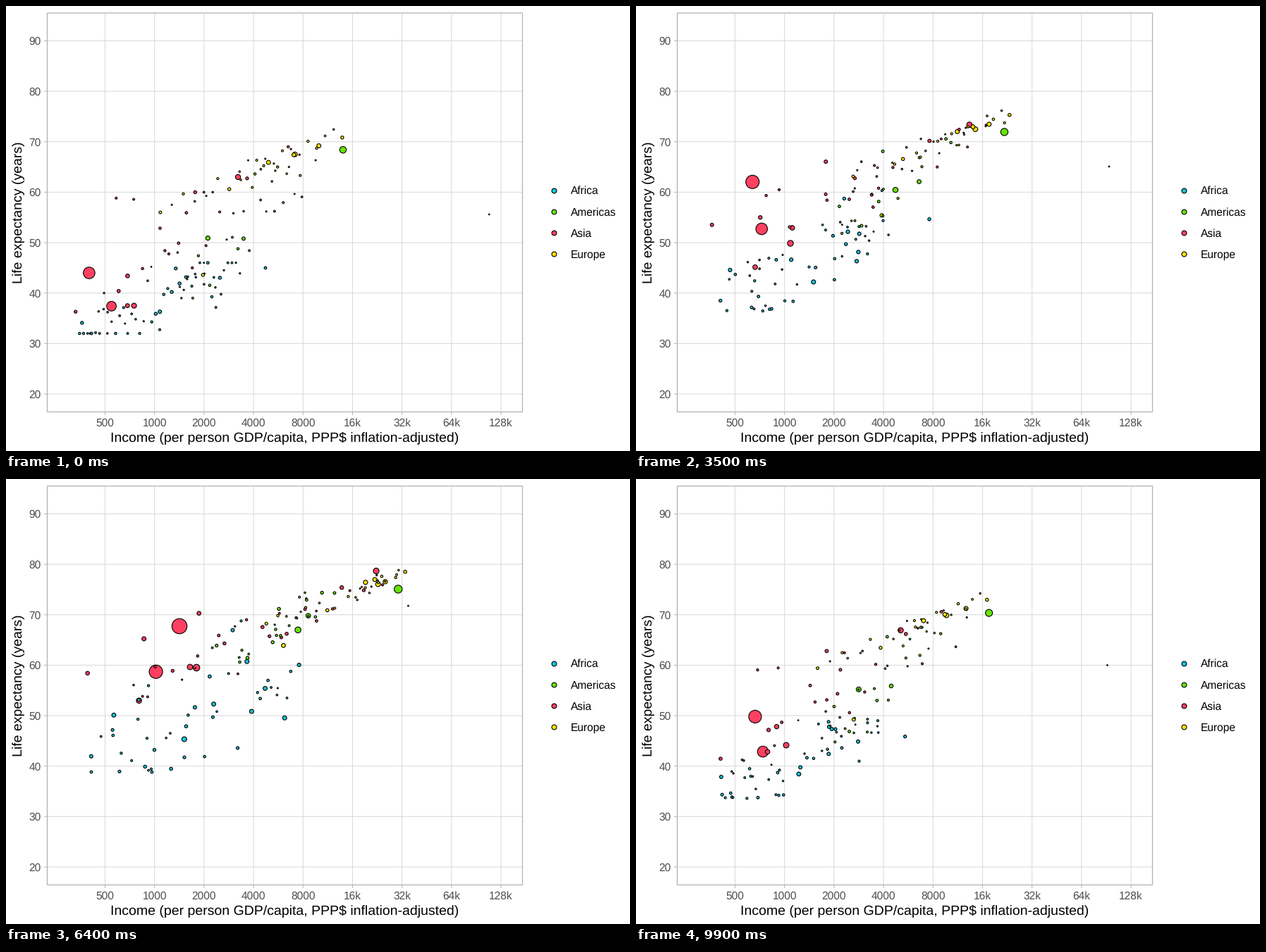
A matplotlib script that plays this animation: 885x632 px, repeating every 10000 ms.

```python
import numpy as np
import matplotlib.pyplot as plt
from matplotlib.animation import FuncAnimation

W, H, DPI = 885, 632, 100
PX = 72 / DPI
LEFT, RIGHT, TOP, BOTTOM = 58.5, 732.5, 10, 576.5
plt.rcParams["font.family"] = "Liberation Sans"
plt.rcParams["text.hinting"] = "none"

COLORS = {"Africa": "#12c3db", "Americas": "#66e400",
          "Asia": "#ff4161", "Europe": "#ffe000"}
GROWTH = {"Africa": 3.7, "Americas": 3.3, "Asia": 2.8, "Europe": 1.25}
# How early income and life expectancy rise; 1 is a steady rise.
BEND = {"Africa": (1.1, 1.8), "Americas": (1.1, 1.3),
        "Asia": (1, 1.25), "Europe": (1.4, 1.2)}

rng = np.random.default_rng(11)
U = np.linspace(0, 1, 12)  # every fifth year from 1952 to 2007
dots = []


def x_of(income):
    return 140.5 + 70.2 * np.log2(np.asarray(income) / 500)


def y_of(years):
    return 49.5 + (90 - np.asarray(years)) * 7.164


def path(points, bend):
    """Spread evenly spaced key points over all the years."""
    u = 1 - (1 - U) ** bend if len(points) == 2 else U
    return np.interp(u, np.linspace(0, 1, len(points)), points)


def add(continent, pop, income, life, growth=None, dip=(0, 0), wobble=0):
    """Add one country; a dip is (step, years of life lost)."""
    bend_income, bend_life = BEND[continent]
    x = path(x_of(income), bend_income) + wobble
    years = path(life, bend_life)
    years[dip[0]] -= dip[1]
    people = pop * (growth or GROWTH[continent]) ** U
    radius = .64 + 11.7 * np.sqrt(people / 1318)
    dots.append((np.array([x, y_of(years), radius]), COLORS[continent]))


def crowd(continent, count, income, life, late_income, late_life, jitter=.2):
    """Scatter small countries between a poor and a rich end."""
    for rank in (np.arange(count) + .5) / count:
        def pick(low, high):
            q = np.clip(rank + rng.normal(0, jitter), 0, 1)
            return low + (high - low) * q

        incomes = (income[0] * (income[1] / income[0]) ** rank,
                   2 ** pick(*np.log2(late_income)))
        swing = rng.normal(0, 18) * np.sin(np.pi * U)
        wobble = swing * np.sin(2 * np.pi * U + rng.uniform(0, 6))
        pop = np.clip(rng.lognormal(1.5, 1), .15, 22)
        add(continent, pop, incomes, (pick(*life), pick(*late_life)), wobble=wobble)


# The largest and most distinct countries, by key points
add("Asia", 556, (400, 513, 670, 1210, 2160, 4959),
    (44, 55, 63.6, 66.8, 70.2, 73), growth=2.37, dip=(2, 9.5))
add("Asia", 372, (547, 665, 740, 930, 1300, 2452), (37.4, 52.1, 59, 64.7), growth=3)
add("Asia", 82, (750, 1030, 1830, 3541), (37.5, 54.5, 70.7))
add("Asia", 86, (3217, 12600, 23000, 31656), (63, 72.8, 79, 82.6), growth=1.5)
add("Asia", 47, (684, 650, 800, 1391), (37.5, 48, 64.1))
add("Asia", 41, (685, 2606), (43.4, 65.5), growth=4)
add("Asia", 26, (605, 700, 840, 2442), (40.4, 74.2))
add("Asia", 20, (331, 360, 380, 944), (36.3, 53, 58.7, 62.1))
add("Asia", .2, (108382, 105000, 31500, 47307), (55.6, 77.6))
add("Americas", 158, (13990, 42952), (68.4, 70.3, 73.9, 75.8, 78.2), growth=1.9)
add("Americas", 57, (2109, 4500, 7700, 9066), (50.9, 72.4))
add("Americas", 30, (3478, 6400, 8700, 11978), (50.8, 76.2))
add("Europe", 69, (7144, 32170), (67.5, 79.4))
add("Europe", 50, (9980, 33203), (69.2, 79.4))
add("Europe", 48, (4931, 28570), (65.9, 80.5))
add("Europe", 42, (7030, 30470), (67.4, 80.7))
add("Europe", 22, (1969, 8458), (43.6, 71.8), growth=3.2)
add("Africa", 33, (1077, 1500, 1500, 2014), (36.3, 46.9))
add("Africa", 22, (1419, 5581), (41.9, 56, 71.3))
add("Africa", 21, (362, 691), (34.1, 52.9))
add("Africa", 14, (4725, 7600, 7500, 9270), (45, 54, 61, 49.3))
add("Africa", 2.5, (493, 863), (40, 46.2), dip=(8, 21))

# Everyone else, by region
crowd("Europe", 13, (3100, 14700), (64, 72.5), (26000, 40000), (78.3, 81.5), .1)
crowd("Europe", 12, (1000, 6900), (56, 66), (6500, 25000), (72.5, 77.5), .1)
crowd("Americas", 22, (1400, 8000), (39, 65), (2700, 16000), (67, 78))
crowd("Asia", 15, (380, 2400), (32, 60), (900, 9000), (60, 74))
crowd("Asia", 12, (1050, 10500), (45, 69), (10500, 42000), (72, 82))
crowd("Africa", 4, (1450, 2450), (42, 45), (3800, 12000), (71, 74))
crowd("Africa", 41, (340, 3400), (32, 46), (430, 9000), (40, 61), .25)

dots.sort(key=lambda d: -d[0][2, 0])
states = np.array([d[0] for d in dots])
states = np.concatenate([states, states[:, :, :1]], axis=2)

FRAMES = 100
STARTS = np.array([2, 11, 20, 28, 38, 47, 55, 63, 71, 79, 87, 95])
ENDS = np.array([8, 17, 26, 35, 44, 52, 60, 68, 76, 84, 92, 100])


def pose(i):
    t = np.clip((i - STARTS) / (ENDS - STARTS), 0, 1).sum()
    k = min(int(t + 1e-9), len(STARTS) - 1)
    return states[:, :, k] + (t - k) * (states[:, :, k + 1] - states[:, :, k])


fig = plt.figure(figsize=(W / DPI, H / DPI), dpi=DPI, facecolor="white")
ax = fig.add_axes([0, 0, 1, 1])
ax.set_xlim(0, W)
ax.set_ylim(H, 0)
ax.axis("off")


def line(xs, ys, color="#b3b3b3", width=1):
    ax.plot(xs, ys, color=color, lw=width * PX, snap=False,
            solid_capstyle="butt", solid_joinstyle="miter", zorder=1)


def label(x, y, s, size=11.2, color="black", **kw):
    ax.text(x, y, s, fontsize=size, color=color, va="baseline", **kw)


for years in range(20, 91, 10):
    y = y_of(years)
    line([LEFT, RIGHT], [y, y], "#d8d8d8")
    line([LEFT - 4.5, LEFT], [y, y])
    label(49.7, y + 5.7, str(years), color="#4d4d4d", ha="right")

for i, s in enumerate("500 1000 2000 4000 8000 16k 32k 64k 128k".split()):
    x = 140.5 + 70.2 * i
    line([x, x], [TOP, BOTTOM], "#d8d8d8")
    line([x, x], [BOTTOM, BOTTOM + 4.5])
    label(x, 596.8, s, color="#4d4d4d", ha="center")

line([LEFT, RIGHT, RIGHT, LEFT, LEFT], [TOP, TOP, BOTTOM, BOTTOM, TOP], width=1.3)

label(395.5, 619, "Income (per person GDP/capita, PPP$ inflation-adjusted)",
      14, ha="center")
label(23.3, 293, "Life expectancy (years)", 14, ha="center",
      rotation=90, rotation_mode="anchor")


def area(radius):
    return (2 * np.asarray(radius) * PX) ** 2


STYLE = dict(edgecolors="black", linewidths=1.1 * PX, zorder=3, snap=False)
for i, (name, color) in enumerate(COLORS.items()):
    y = 261.5 + 30.2 * i
    ax.scatter([776.5], [y], s=area(3.45), c=[color], **STYLE)
    label(801, y + 5.8, name)

cloud = ax.scatter(*pose(0)[:, :2].T, c=[d[1] for d in dots], **STYLE)


def draw(i):
    p = pose(i)
    cloud.set_offsets(p[:, :2])
    cloud.set_sizes(area(p[:, 2]))
    return cloud,


anim = FuncAnimation(fig, draw, frames=FRAMES, init_func=lambda: draw(0),
                     interval=100, repeat=True, repeat_delay=0)
plt.show()
```
